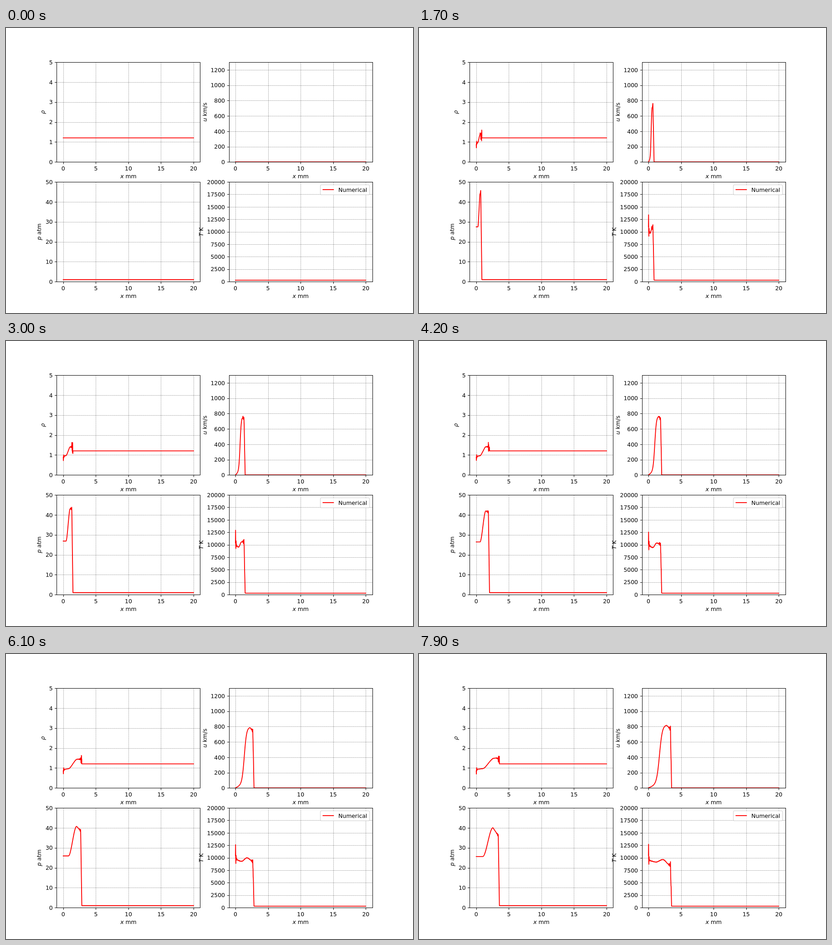
Animation of 894x626 px, one loop 8 s. Source, as an HTML page:

```html
<!DOCTYPE html>
<html lang="en">
<head>
<meta charset="utf-8">
<title>Blast wave profiles</title>
<style>
html, body { margin: 0; width: 100%; height: 100%; overflow: hidden; background: #fff; }
svg { display: block; }
text { font: 12.42px "DejaVu Sans", sans-serif; white-space: pre; }
.it { font-style: italic; }
.grid { stroke: #000; stroke-width: .62; stroke-dasharray: .62 1.02; }
.axis { stroke: #000; stroke-width: 1; fill: none; }
.curve { stroke: #f00; stroke-width: 1.86; fill: none; stroke-linejoin: round; stroke-linecap: square; }
</style>
</head>
<body>
<svg id="stage" width="894" height="626" viewBox="0 0 894 626"></svg>
<script>
const W = 314.93, H = 219.1, LOOP = 8000, STEP = 100;
const stage = document.getElementById('stage');

function add(parent, tag, attrs, content = '') {
  const el = document.createElementNS('http://www.w3.org/2000/svg', tag);
  for (const k in attrs) el.setAttribute(k, attrs[k]);
  el.innerHTML = content;
  return parent.appendChild(el);
}
const line = (cls, x1, y1, x2, y2) => add(stage, 'line', { class: cls, x1, y1, x2, y2 });
const label = (x, y, anchor, content, turn = 0) => add(stage, 'text',
  { x, y, 'text-anchor': anchor, transform: `rotate(${turn} ${x} ${y})` }, content);
const italic = (symbol, rest) => `<tspan class="it">${symbol}</tspan>${rest}`;
const snap = v => Math.round(v) + .5;

// Builds one set of axes and returns a function that draws its curve.
function panel(left, top, max, step, name, nameX) {
  const bottom = top + H, x0 = snap(left), x1 = snap(left + W), y0 = snap(top), y1 = snap(bottom);
  const px = v => (v + 1) / 22 * W, py = v => H * (1 - v / max);
  for (let v = 0; v <= 20; v += 5) line('grid', snap(left + px(v)), y1, snap(left + px(v)), y0);
  for (let v = 0; v <= max; v += step) line('grid', x0, snap(top + py(v)), x1, snap(top + py(v)));

  const clip = add(stage, 'svg', { x: left, y: top, width: W, height: H });
  const path = add(clip, 'path', { class: 'curve' });

  add(stage, 'rect', { class: 'axis', x: x0, y: y0, width: x1 - x0, height: y1 - y0 });
  for (let v = 0; v <= 20; v += 5) {
    const x = left + px(v);
    line('axis', snap(x), y1, snap(x), y1 + 4.4);
    label(x, Math.round(bottom + 18.7), 'middle', v);
  }
  for (let v = 0; v <= max; v += step) {
    const y = top + py(v);
    line('axis', x0 - 4.4, snap(y), x0, snap(y));
    label(left - 8.7, Math.round(y + 4.7), 'end', v);
  }
  label(left + W / 2, Math.round(bottom + 35.8), 'middle', italic('x', ' mm'));
  label(nameX, top + H / 2, 'middle', name, -90);
  return points => path.setAttribute('d',
    'M' + points.map(([x, v]) => px(x).toFixed(2) + ' ' + py(v).toFixed(2)).join('L'));
}

const L1 = 111.45, L2 = 489.67, T1 = 75.12, T2 = 338.04;
const plots = {
  rho: panel(L1, T1, 5, 1, italic('ρ', ''), 85.3),
  u: panel(L2, T1, 1300, 200, italic('u', ' km/s'), 441),
  p: panel(L1, T2, 50, 10, italic('p', ' atm'), 76.8),
  T: panel(L2, T2, 20000, 2500, italic('T', ' K'), 433.5)
};

add(stage, 'rect', { x: 690.5, y: 344.5, width: 108, height: 22, rx: 2.5,
  fill: '#fff', stroke: '#ccc', 'stroke-width': 1.24, opacity: .8 });
line('curve', 696.3, 355, 719.3, 355);
label(730, 360, 'start', 'Numerical');

const clamp = v => Math.max(0, Math.min(1, v));
function smooth(from, to, v) {
  const s = clamp((v - from) / (to - from));
  return s * s * (3 - 2 * s);
}
function noise(a, b) {
  const v = Math.sin(a * 12.9898 + b * 78.233) * 43758.5453;
  return v - Math.floor(v) - .5;
}

// The shape is nearly self-similar: q is the distance relative to the front.
function profiles(t) {
  const out = { rho: [], u: [], p: [], T: [] };
  const put = (x, rho, u, p, T) => {
    out.rho.push([x, rho]); out.u.push([x, u]); out.p.push([x, p]); out.T.push([x, T]);
  };
  const front = .525 * t - .0095 * t * t;
  const width = Math.min(.18, front / 2), corner = front - width;
  const uPeak = (747 + 1.2 * t * t) * (1 - Math.exp(-3.2 * t));
  const pWall = 25 + 3.6 * Math.exp(-t / 4.5), pPeak = 39 + 9.5 * Math.exp(-t / 3.6);
  const tLow = 9800 - 82 * t, tPeak = 11150 - 190 * t, tEnd = 11950 - 430 * t;
  const decay = clamp((t - 3.6) * .055);

  for (let i = 0, x = 0; x < front; x = ++i * .02) {
    const at = Math.min(x, corner), q = at / front, jitter = noise(i, t);
    const near = clamp(1 - (corner - at) / .35);
    const ripple = near * Math.cos((corner - at) * 40) * .03;

    const rise = 1 / (1 + Math.exp((.48 - q) / .062));
    let u = uPeak * (rise + .15 * q * (1 - rise) - .4 * Math.max(0, q - .78) + ripple);
    let p = pWall + (pPeak - pWall) *
      (smooth(.28, .72, q) - decay * Math.max(0, q - .72) * 5 + ripple * 1.5);

    // Ringing at the wall fades within a fraction of a millimetre.
    const ring = 700 * Math.exp(-x / .1) + 3800 * Math.exp(-x / .05) * Math.sin(x * Math.PI / .04);
    let T = tLow + 300 * (1 - smooth(0, .33, q)) + (tPeak - tLow) * smooth(.33, .62, q) +
      (tEnd - tPeak) * smooth(.62, .93, q) + ring;
    T *= 1 + ripple + jitter * (.008 + .035 * near + .06 * Math.exp(-x / .15));
    let rho = 346 * p / T;

    if (x > corner) {
      const r = (x - corner) / width;
      u = Math.max(0, (u + jitter * 130) * (1 - r));
      p += (1 - p) * r;
      T += (300 - T) * r + jitter * 1800 * (1 - r);
      rho = 1.34 + noise(i, t + 9) * .6;
    }
    put(x, rho, u, p, T);
  }
  put(front, 1.205, 0, 1, 300);
  put(20, 1.205, 0, 1, 300);
  return out;
}

const start = performance.now();
let shown = -1;
function draw() {
  const index = Math.floor((performance.now() - start) % LOOP / STEP);
  if (index !== shown) {
    shown = index;
    const data = profiles(index * STEP / 1000);
    for (const k in plots) plots[k](data[k]);
  }
  requestAnimationFrame(draw);
}
draw();
</script>
</body>
</html>
```
